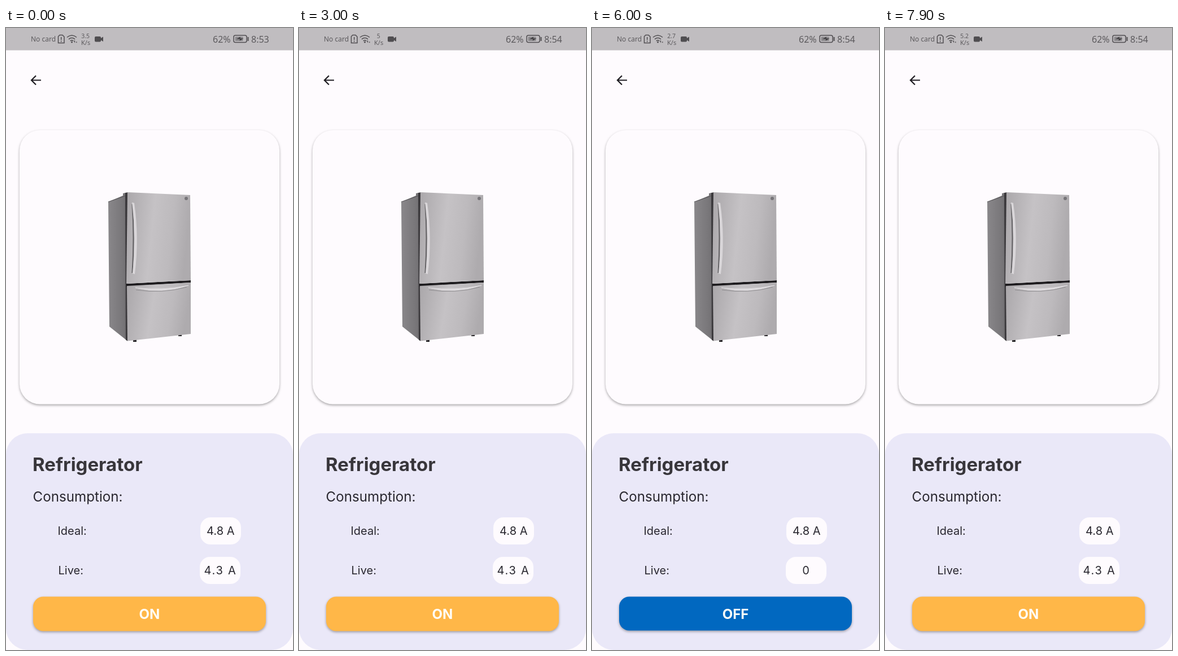
Animation of 508 by 1102 pixels, one loop 8000 ms. Source, as an HTML page:

```html
<!DOCTYPE html>
<html lang="en">
<head>
<meta charset="utf-8">
<title>Appliance control</title>
<style>
  html, body { margin: 0; width: 100%; height: 100%; overflow: hidden; background: #fefbfe; }
  svg { display: block; width: 508px; height: 1102px; }
  text { font-family: Inter, sans-serif; fill: #29272f; }
  .status text { font-family: "Noto Sans", sans-serif; fill: #5c5a5d; }
  .mid { text-anchor: middle; }
  .row { font-size: 20px; }
  .shade { filter: drop-shadow(0 2px 2px #0005); }
</style>
</head>
<body>
<svg viewBox="0 0 508 1102">
  <defs>
    <linearGradient id="side" x2="1">
      <stop stop-color="#89878a"/><stop offset=".8" stop-color="#777578"/><stop offset="1" stop-color="#676568"/>
    </linearGradient>
    <linearGradient id="steel" x2="1" y2=".15">
      <stop stop-color="#aaa7aa"/><stop offset=".45" stop-color="#c5c2c5"/>
      <stop offset=".75" stop-color="#bdbabd"/><stop offset="1" stop-color="#aeabae"/>
    </linearGradient>
    <clipPath id="buttonClip"><rect id="clipBox" x="48" y="1007.5" width="412" height="60" rx="18"/></clipPath>
  </defs>

  <rect width="508" height="1102" fill="#fefbfe"/>

  <g class="status">
    <rect width="508" height="39.5" fill="#c0bdc0"/>
    <text x="44" y="24" font-size="12">No card</text>
    <g fill="none" stroke="#504e51" stroke-width="1.5">
      <path d="M95 12.5h5l3 3v11H92.5V15z M97.7 16v5 M97.7 22.5v2"/>
      <path d="M108 16.5q8.5-7 17 0 M111 19.8q5.5-4.5 11 0 M113.8 22.8q2.7-2 5.4 0"/>
      <rect x="403" y="13" width="23" height="12.5" rx="3"/>
      <path d="M428.5 16v7" stroke-width="2"/>
    </g>
    <circle cx="116.5" cy="25" r="1.5" fill="#504e51"/>
    <path d="M120 23.5l2-2v5z M125 26.5l-2-2h3z" fill="#504e51"/>
    <rect x="405.5" y="15.5" width="14" height="7.5" rx="1" fill="#8b898c"/>
    <path d="M408 19.5l7-4-.5 3h6l-7 4 .5-3z" fill="#3d3b3e"/>
    <path d="M159 15h7q2 0 2 2v1l4-2.5v8.500l-4-2.500v1q0 2-2 2h-7q-2 0-2-2v-5.500q0-2 2-2z" fill="#504e51"/>
    <text id="speed" class="mid" x="140.700" y="18" font-size="10.500"></text>
    <text x="133" y="30" font-size="11">K/s</text>
    <text x="366" y="25.500" font-size="16">62%</text>
    <text id="clock" x="434" y="25.500" font-size="16"></text>
  </g>

  <path d="M62 92.500H45.500 M53 84.500l-8 8 8 8" fill="none" stroke="#1d1b20" stroke-width="2.200"/>

  <rect class="shade" x="24" y="181" width="460" height="485.500" rx="36" fill="#fefbfe"/>

  <g id="fridge">
    <path d="M225 551h6v5h-6z M305 542h6v4h-6z" fill="#252326"/>
    <path d="M181 308l26-11v-4l8-2v263.500l-32-25.500z" fill="url(#side)"/>
    <path d="M181 308l31-11" stroke="#565457"/>
    <path d="M211 292h4V554.500l-3-2z" fill="#3a383b"/>
    <path d="M213 453l114-6v4l-114 7z" fill="#1e1c1f"/>
    <path d="M215 291l111 5 1 151-114 6z" fill="url(#steel)"/>
    <path d="M214 457l113-6v91l-112 12.500z" fill="url(#steel)"/>
    <path d="M223.500 312q4 60 0 122" fill="none" stroke="#626063" stroke-width="2"/>
    <path d="M223 309l4 1q9 62 1 126l-4-1q7-63-1-126z" fill="#d9d6d9"/>
    <path d="M229 460q46 6 94-4-45 16-94 4z" fill="#dedbde" stroke="#dedbde"/>
    <path d="M230 464q46 7 90-5" fill="none" stroke="#8c8a8d"/>
    <circle cx="319" cy="302" r="3" fill="#777579"/>
  </g>

  <rect y="718" width="508" height="384" rx="38" fill="#eae8f8"/>
  <text x="47" y="784.500" font-size="33" font-weight="700" style="fill:#38363b">Refrigerator</text>
  <text x="47.500" y="839" font-size="24.200">Consumption:</text>
  <g class="row">
    <text x="91.500" y="897.500">Ideal:</text>
    <text x="92.500" y="967.500">Live:</text>
    <rect x="344" y="867" width="72" height="48" rx="18" fill="#fefbfe"/>
    <rect x="343" y="937" width="72" height="48" rx="18" fill="#fefbfe"/>
    <text class="mid" x="379.800" y="897.500">4.8 A</text>
    <text id="live" class="mid" y="967.500"></text>
  </g>

  <rect id="button" class="shade" x="48" y="1007.500" width="412" height="60" rx="18"/>
  <g clip-path="url(#buttonClip)" fill="#fff">
    <circle id="ripple" cx="406" cy="1037"/>
    <circle id="touch" cx="406" cy="1037" r="13" fill="#8ec6e8" fill-opacity=".35"/>
  </g>
  <text id="label" class="mid" x="254" y="1046.500" font-size="24" font-weight="700" style="fill:#fffdf8"></text>
</svg>
<script>
const LOOP = 8000, TAPS = [4500, 6700], HOLD = 300, FADE = 400;
const SPEEDS = [[7800, "5.2"], [4900, "2.7"], [2000, "5"], [0, "3.5"]];
const el = id => document.getElementById(id);
const set = (id, attrs) => {
  for (const key in attrs) el(id).setAttribute(key, attrs[key]);
};
const write = (id, text) => {
  if (el(id).textContent !== text) el(id).textContent = text;
};

function draw(t) {
  const on = t < TAPS[0] + HOLD || t >= TAPS[1] + HOLD;
  const tap = TAPS.find(s => t >= s && t < s + HOLD + FADE);
  const age = tap === undefined ? -1 : t - tap;
  const fade = age < 0 ? 0 : 1 - Math.max(0, age - HOLD) / FADE;

  write("speed", SPEEDS.find(([start]) => t >= start)[1]);
  write("clock", t < 2000 ? "8:53" : "8:54");
  write("live", on ? "4.3 A" : "0");
  set("live", { x: on ? 379.5 : 378.5, "letter-spacing": on ? 1.8 : 0 });

  write("label", on ? "ON" : "OFF");
  set("button", { fill: on ? "#ffb748" : "#0168c0", height: on ? 61 : 60 });
  set("clipBox", { height: on ? 61 : 60 });
  set("ripple", { r: Math.max(0, 60 + age * 1.25), "fill-opacity": 0.215 * fade });
  set("touch", { visibility: age >= 0 && age < HOLD - 50 ? "visible" : "hidden" });
}

const begin = performance.now();
function tick() {
  draw((performance.now() - begin) % LOOP);
  requestAnimationFrame(tick);
}
tick();
</script>
</body>
</html>
```
